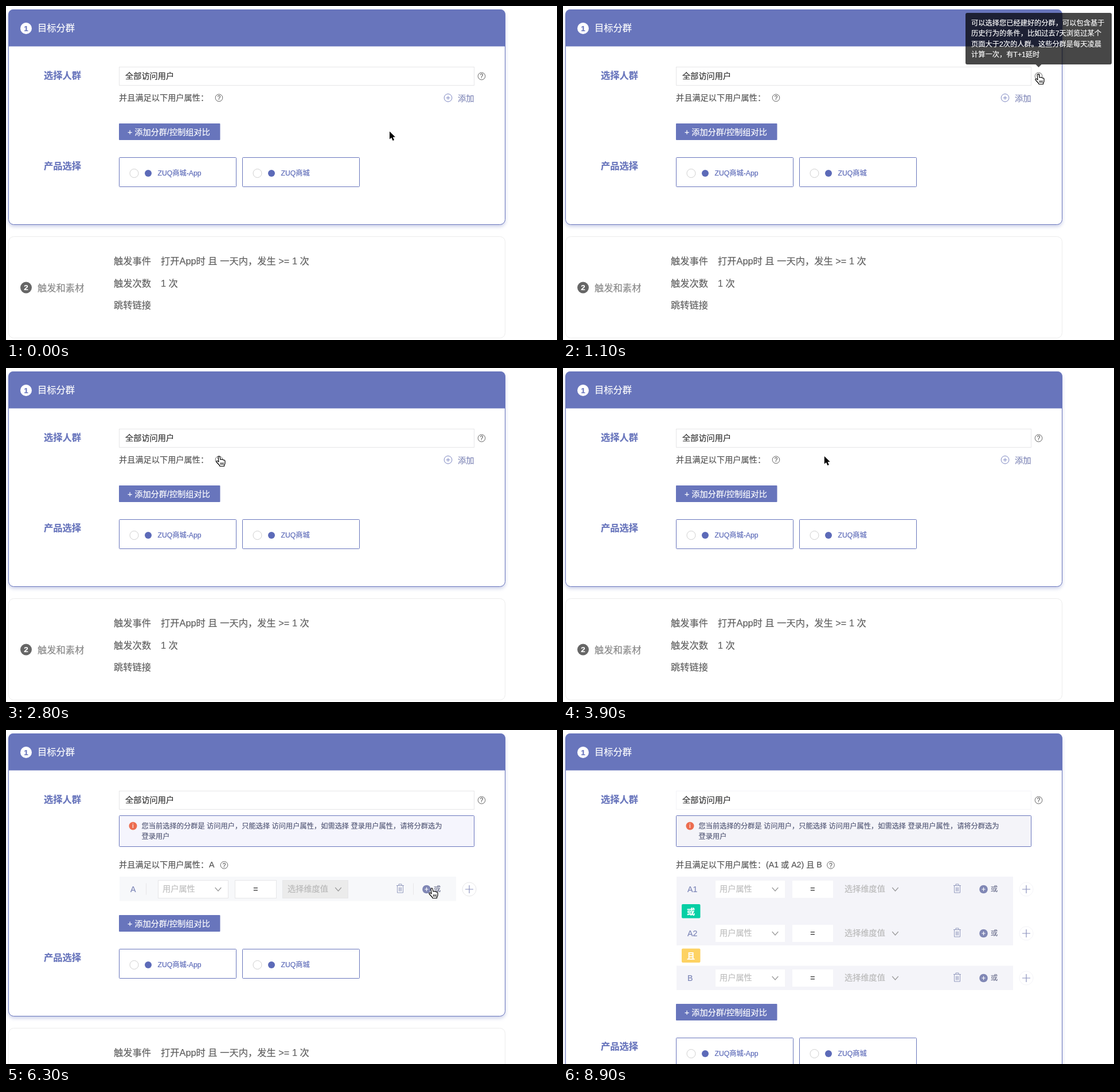
An HTML page for the animation above (9100 ms loop, 961 by 583 pixels).

```html
<!DOCTYPE html>
<html lang="zh-CN">
<head>
<meta charset="utf-8">
<title>目标分群</title>
<style>
  html, body { margin: 0; width: 100%; height: 100%; overflow: hidden; background: #fff; }
  svg { display: block; font-family: "Liberation Sans", "Noto Sans CJK SC", "Noto Sans CJK", sans-serif; }
  text { stroke-width: .2px; }
  .card { filter: drop-shadow(0 3px 3px rgba(104, 117, 188, .35)); }
</style>
</head>
<body>
<svg width="961" height="583" viewBox="0 0 961 583">
  <g id="scene"></g>
  <g id="arrow"><path d="M0 0V13.6L3.2 10.7L5.6 16L8 15L5.7 9.7H9.9Z" stroke="#fff" stroke-width="1.4" paint-order="stroke"/></g>
  <g id="hand" stroke="#000" stroke-width="1.2" stroke-linejoin="round">
    <path fill="#fff" d="M-1 2Q.5 0 2 2L3 7Q4.5 5.5 5.7 7Q7.5 6 8.5 8Q10.8 7.2 11 9.5V13Q11 15 9.5 16.5V18.5H2L1.5 17L-3.5 11.5Q-5 9.5 -3 9Q-1.5 9 0 11Z"/>
    <path d="M3.6 12V16M5.8 12V16M8 12V16" stroke-width="1"/>
  </g>
</svg>
<script>
const DURATION = 9100, STEP = 100;
const BLUE = '#6875bc', SMALL = 12.24, BODY = 14.2, LARGE = 16.3, ROW_GAP = 77.5;
const $ = id => document.getElementById(id);

// Text placed by its left edge and vertical centre.
const text = (x, y, s, size, fill, extra = '') =>
  `<text x="${x}" y="${y + size * .37}" font-size="${size}" fill="${fill}" stroke="${fill}" ${extra}>${s}</text>`;
const mid = 'text-anchor="middle"', bold = 'font-weight="600"';
const rect = (x, y, w, h, fill, stroke = 'none', r = 0) =>
  `<rect x="${x}" y="${y}" width="${w}" height="${h}" rx="${r}" fill="${fill}" stroke="${stroke}"/>`;
const circle = (x, y, r, fill, stroke = 'none') =>
  `<circle cx="${x}" cy="${y}" r="${r}" fill="${fill}" stroke="${stroke}"/>`;
const line = (d, stroke, width = 1) =>
  `<path d="${d}" fill="none" stroke="${stroke}" stroke-width="${width}"/>`;
const plus = (x, y, r, color, width) => line(`M${x - r} ${y}h${2 * r}M${x} ${y - r}v${2 * r}`, color, width);
const chevron = (x, y) => line(`M${x - 5.3} ${y - 3}l5.3 6l5.3 -6`, '#999', 1.2);
const help = (x, y) => circle(x, y, 6.3, 'none', '#666') + text(x, y, '?', 10, '#555', mid);

const stepNumber = (y, n, fill, color) =>
  circle(35, y, 10, fill) + text(35, y, n, 13.5, color, mid + ' ' + bold);

function tooltip(cx, y, lines) {
  const h = lines.length * 18.4 + 16.4, x = cx - 127.5;
  return `<g fill-opacity=".72"><path d="M${cx - 5} ${y + h}h10l-5 5z"/>${rect(x, y, 255, h, '#000', 'none', 3)}</g>` +
    lines.map((s, i) => text(x + 10, y + 17.5 + i * 18.4, s, SMALL, '#fff')).join('');
}

function condition(y, name, look) {
  const ink = '#7d86b8';
  return text(217, y, name, BODY, ink) +
    line(`M244.5 ${y - 10}v20M710.5 ${y - 10}v20`, look.border) +
    rect(265.5, y - 15, 122, 31, '#fff', look.border) +
    text(273, y - .5, '用户属性', BODY, '#bfbfbf') + chevron(370, y + .5) +
    rect(399.5, y - 15, 72, 31, '#fff', look.border) + text(435.5, y, '=', BODY, '#333', mid) +
    rect(482.5, y - 15, 114, 31, look.disabled, look.border) +
    text(491, y - .5, '选择维度值', BODY, '#b8b8b8') + chevron(579.5, y + .5) +
    line(`M681 ${y - 6}h13M685 ${y - 6}v-2.5h5v2.5M682.5 ${y - 6}v12.5h10v-12.5M685.5 ${y - 3}v7M687.5 ${y - 3}v7M689.5 ${y - 3}v7`, '#8a91b8', .9) +
    circle(733.5, y + .5, 7.3, '#8087b5') + plus(733.5, y + .5, 3.2, '#fff', 1.2) +
    text(746, y, '或', SMALL, '#6f7390') +
    circle(808, y + .5, 12, '#fff', look.border) + plus(808, y + .5, 7, '#8a90bd', 1.2);
}

const badge = (y, s, fill) =>
  rect(207, y - 12.3, 32.5, 24.6, fill, 'none', 2) + text(223.2, y, s, BODY, '#fff', mid + ' ' + bold);

function conditions(count, look) {
  const names = [[], ['A'], ['A1', 'A2'], ['A1', 'A2', 'B']][count];
  const y = i => 277.5 + Math.floor(i * ROW_GAP);
  return rect(197.5, 149.5, 619, 54, look.alert, BLUE, 1) +
    circle(221.5, 167.5, 7, '#ec6d50') + text(221.5, 167.5, 'i', 10.5, '#fff', mid) +
    text(236.5, 167.2, '您当前选择的分群是 访问用户，只能选择 访问用户属性，如需选择 登录用户属性，请将分群选为', SMALL, '#555a78') +
    text(236.5, 185.6, '登录用户', SMALL, '#555a78') +
    rect(198, 256, 587, count > 1 ? 120 : 42.5, look.row) +
    (count > 2 ? rect(198, 411.5, 587, 42.5, look.row) : '') +
    names.map((name, i) => condition(y(i), name, look)).join('') +
    (count > 1 ? badge(316.3, '或', '#06cfa5') : '') +
    (count > 2 ? badge(393.8, '且', '#fdd263') : '');
}

const product = (x, y, name) =>
  rect(x, y, 204, 51, '#fff', BLUE, 1) + circle(x + 26, y + 27.5, 7.5, '#fff', '#d0d0d0') +
  circle(x + 50.5, y + 27.5, 6, '#5c6ab8') + text(x + 67, y + 27, name, SMALL, '#5c6ab8');

const summary = (y, label, value) => text(188, y, label, LARGE, '#606060') + text(270, y, value, LARGE, '#606060');

function scene(count, tip) {
  const shift = count ? Math.floor(118.5 + (count - 1) * ROW_GAP) : 0;
  const attrY = count ? 235 : 159.5;
  const look = count > 2
    ? { border: '#f4f4f8', disabled: '#f4f4f9', row: '#f4f4f9', alert: '#f4f4f9' }
    : { border: '#e6e6e8', disabled: '#ebebeb', row: '#f7f8fa', alert: '#f5f5fd' };
  const [formula, helpX] = [['', 371.5], ['A', 380.5], ['A1 或 A2', 428.5], ['(A1 或 A2) 且 B', 467]][count];

  return `<g class="card">${rect(4.5, 6.5, 866, 375 + shift, '#fff', BLUE, 9)}</g>` +
    `<path d="M4 70.5V15.5Q4 6 13.5 6H861.5Q871 6 871 15.5V70.5Z" fill="${BLUE}"/>` +
    stepNumber(39, 1, '#fff', BLUE) + text(55, 38.3, '目标分群', LARGE, '#fff') +
    text(66, 121, '选择人群', LARGE, BLUE, bold) +
    rect(197.5, 106.5, 619, 32, '#fff', look.border) + text(208, 122.2, '全部访问用户', BODY, '#333') +
    help(829.5, 122.5) +
    text(197, attrY, '并且满足以下用户属性：', BODY, '#555') + text(354, attrY, formula, BODY, '#555') +
    help(helpX, attrY + .8) +
    (count ? conditions(count, look)
      : circle(771, 160.3, 6.8, 'none', '#7a84c0') + plus(771, 160.3, 3.5, '#7a84c0', 1) +
        text(788, 160.3, '添加', BODY, '#8088b8')) +
    rect(197, 205 + shift, 176.5, 29, BLUE, 'none', 1) +
    text(212, 219.6 + shift, '+ 添加分群/控制组对比', BODY, '#fff') +
    text(66, 279.2 + shift, '产品选择', LARGE, BLUE, bold) +
    product(197.5, 264.5 + shift, 'ZUQ商城-App') + product(412.5, 264.5 + shift, 'ZUQ商城') +
    rect(4.5, 402.5 + shift, 866, 177, '#fff', '#ececec', 9) +
    stepNumber(491.5 + shift, 2, '#666', '#fff') + text(55, 491.5 + shift, '触发和素材', LARGE, '#888') +
    summary(445 + shift, '触发事件', '打开App时 且 一天内，发生 &gt;= 1 次') +
    summary(483.7 + shift, '触发次数', '1 次') + summary(522.3 + shift, '跳转链接', '') +
    (tip === 1 ? tooltip(829.5, 12, ['可以选择您已经建好的分群，可以包含基于',
      '历史行为的条件，比如过去7天浏览过某个', '页面大于2次的人群。这些分群是每天凌晨', '计算一次，有T+1延时']) : '') +
    (tip === 2 ? tooltip(371.5, 67, ['可以在已选择的分群基础上，再按照用户属',
      '性进行筛选，同时满足分群和属性条件的用', '户会被选中，属性条件实时计算']) : '');
}

// Pointer hot spot: time, x, y.
const path = [
  [0, 669, 219], [900, 828, 118], [2000, 828, 118], [2700, 371, 153], [3700, 371, 153],
  [4400, 799, 158], [5200, 799, 158], [5800, 742, 275], [6400, 742, 275],
  [7000, 796, 361], [7300, 808, 353], [7800, 808, 353], [8500, 560, 495]
];
const handTimes = [[800, 2100], [2700, 3800], [5700, 6500], [6900, 7900]];
const within = (t, [a, b]) => t >= a && t < b;

function pointerAt(t) {
  const i = path.findIndex(p => p[0] > t);
  if (i < 0) return path[path.length - 1].slice(1);
  const [t0, x0, y0] = path[i - 1], [t1, x1, y1] = path[i];
  const u = (t - t0) / (t1 - t0), e = u * u * (3 - 2 * u);
  return [x0 + (x1 - x0) * e, y0 + (y1 - y0) * e];
}

let shown = '';
function draw(now) {
  const t = Math.floor(now % DURATION / STEP) * STEP;
  const count = [5200, 6400, 7500].filter(start => t >= start).length;
  const tip = within(t, [900, 2200]) ? 1 : within(t, [3000, 3900]) ? 2 : 0;
  const key = `${count}/${tip}`;
  if (key !== shown) $('scene').innerHTML = scene(count, tip);
  shown = key;

  const [x, y] = pointerAt(t);
  const kind = t >= 8500 ? '' : handTimes.some(span => within(t, span)) ? 'hand' : 'arrow';
  for (const id of ['arrow', 'hand']) {
    $(id).setAttribute('transform', `translate(${x} ${y})`);
    $(id).style.display = id === kind ? '' : 'none';
  }
}

const start = performance.now();
function frame() {
  draw(performance.now() - start);
  requestAnimationFrame(frame);
}
frame();
</script>
</body>
</html>
```
